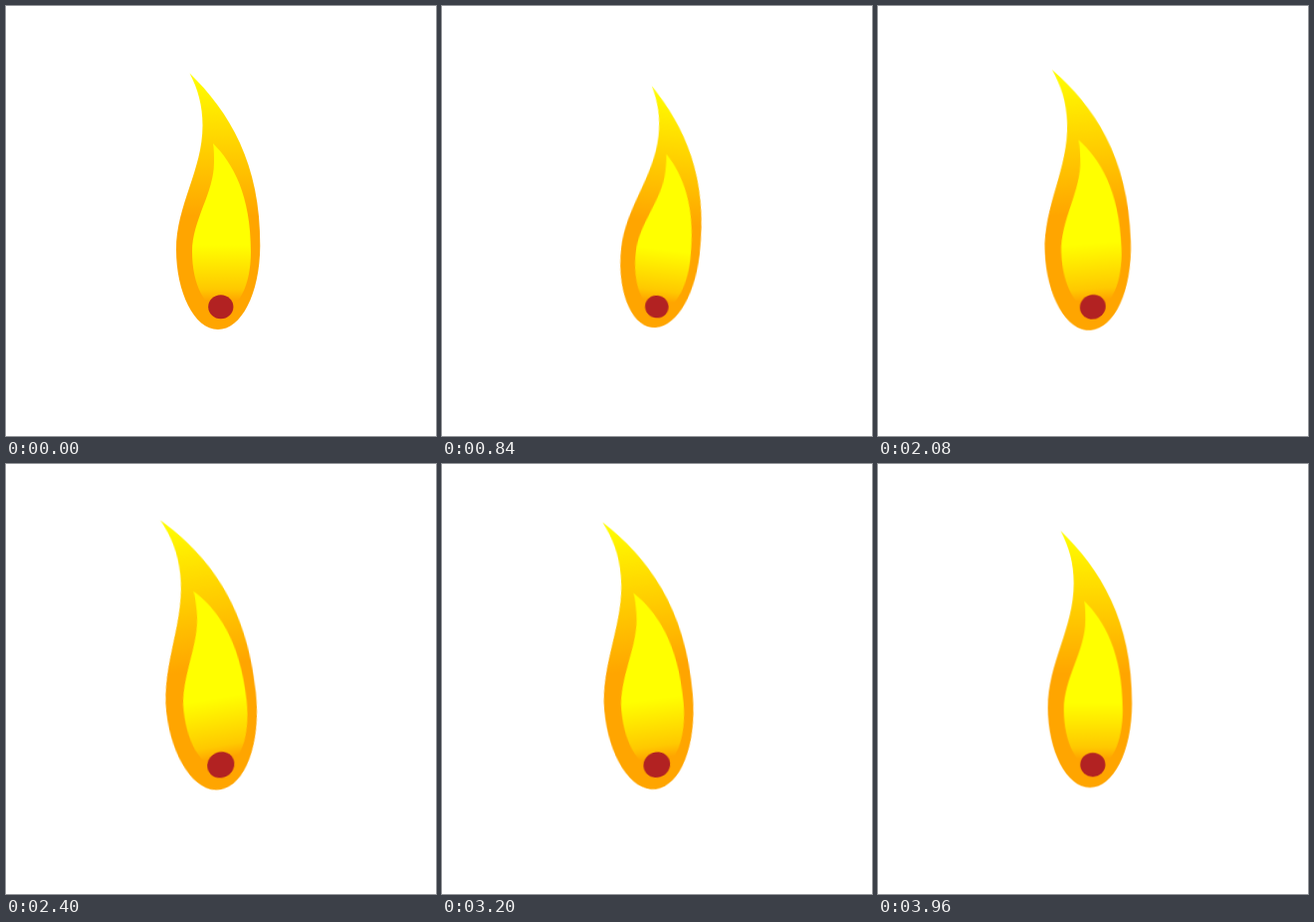
Write an HTML page that moves like this. It is 432 px wide and 432 px high and loops after 4 s.

```html
<!DOCTYPE html>
<html lang="en">
<head>
<meta charset="utf-8">
<title>Flame</title>
<style>
  html, body { margin: 0; width: 100%; height: 100%; overflow: hidden; background: #fff; }
  svg { display: block; width: 100%; height: 100%; }
  .flame {
    transform-box: view-box;
    transform-origin: 216px 302px;
    animation: flicker 4s linear infinite;
  }
  @keyframes flicker {
    0%, 100% { transform: scale(1) skew(0deg, 0deg); }
    30% { transform: scale(.9) skew(-9deg, 10deg); }
    65% { transform: scale(1.1) skew(8.7deg, -13deg); }
  }
</style>
</head>
<body>
<svg viewBox="0 0 432 432">
  <defs>
    <linearGradient id="outer" gradientUnits="userSpaceOnUse" x1="0" y1="68" x2="0" y2="211">
      <stop offset="0" stop-color="#ff0"/>
      <stop offset="1" stop-color="#ffa500"/>
    </linearGradient>
    <linearGradient id="inner" gradientUnits="userSpaceOnUse" x1="0" y1="240" x2="0" y2="296">
      <stop offset="0" stop-color="#ff0"/>
      <stop offset=".8" stop-color="#ffc800"/>
      <stop offset="1" stop-color="#ffa500"/>
    </linearGradient>
  </defs>
  <g class="flame">
    <path fill="url(#outer)" d="M184.5 67.5 C224 106 256 158 255.3 241 C255 290 236 325 213 325
      C189 325 171 287 171 245 C171 200 197.5 165 197.5 120 C197.5 100 193 84 184.5 67.5Z"/>
    <path fill="url(#inner)" d="M208 138 C228 158 246 190 246 247 C246 280 234 305 217 305
      C200 305 187 280 187 247 C187 215 209 188 209 157 C209 150 209 144 208 138Z"/>
    <ellipse cx="215.8" cy="302.2" rx="12.6" ry="12" fill="#b22222"/>
  </g>
</svg>
</body>
</html>
```
